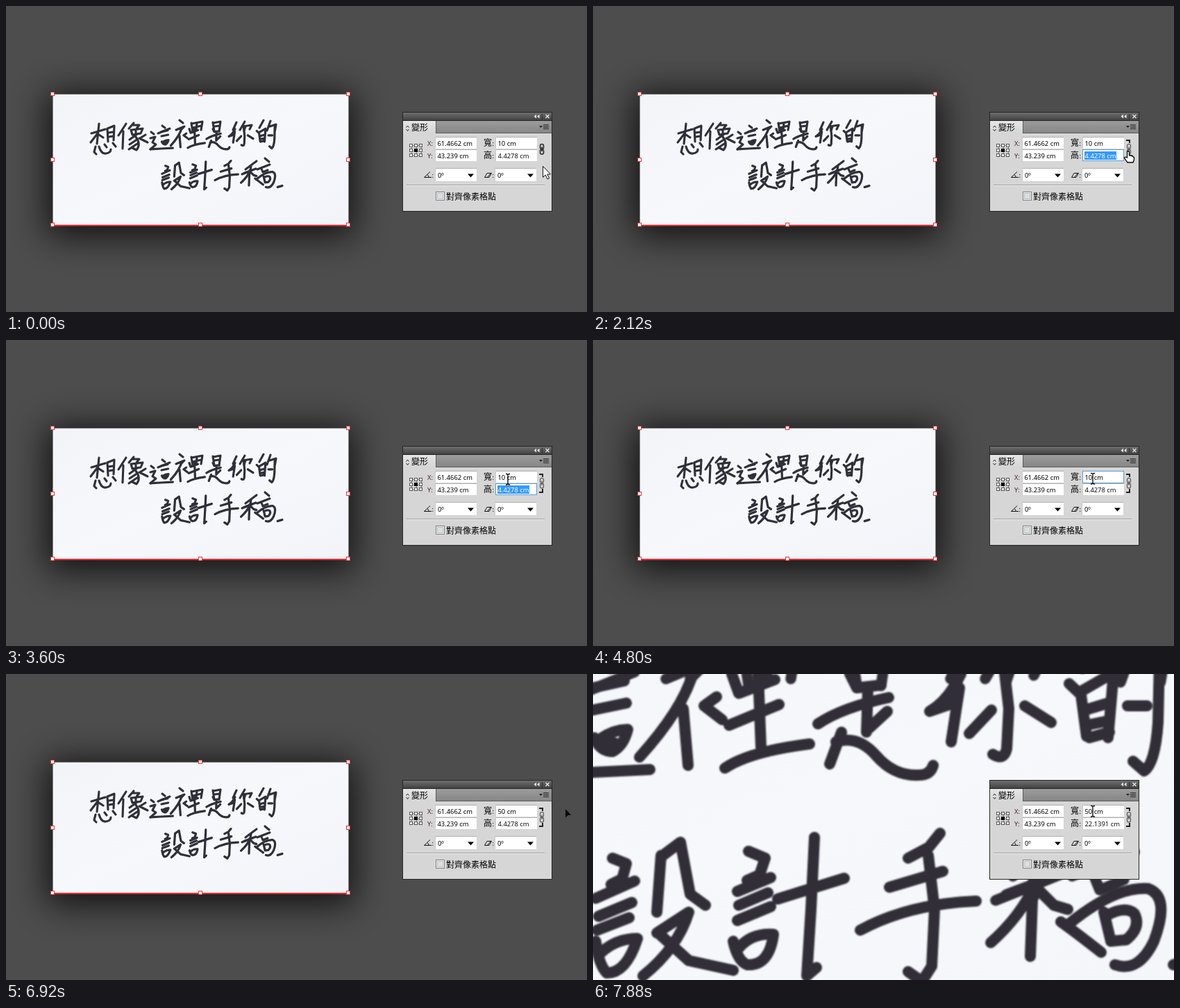
Write an HTML page that moves like this. It is 837x442 px and loops after 8000 ms.

```html
<!DOCTYPE html>
<html lang="zh-Hant">
<head>
<meta charset="utf-8">
<title>變形</title>
<style>
html, body { margin: 0; width: 100%; height: 100%; overflow: hidden; background: #4d4d4d; }
svg { display: block; width: 837px; height: 442px; }
text { font: 9.4px "Noto Sans", "Open Sans", sans-serif; fill: #000; }
.cjk { font: 500 12px "Noto Sans CJK TC", "Noto Sans CJK", sans-serif; }
.ink path { fill: none; stroke: #302f39; stroke-linecap: round; stroke-linejoin: round; }
.box { shape-rendering: crispEdges; }
</style>
</head>
<body>
<svg viewBox="0 0 837 442">
  <defs>
    <linearGradient id="paper" x2="1" y2="1">
      <stop stop-color="#f2f4f8"/><stop offset=".5" stop-color="#f6f8fb"/><stop offset="1" stop-color="#f2f4f9"/>
    </linearGradient>
    <linearGradient id="bar" x2="0" y2="1"><stop stop-color="#6e6e6e"/><stop offset="1" stop-color="#424242"/></linearGradient>
    <linearGradient id="tabs" x2="0" y2="1"><stop stop-color="#9c9c9c"/><stop offset="1" stop-color="#858585"/></linearGradient>
    <linearGradient id="tab" x2="0" y2="1"><stop stop-color="#e6e6e6"/><stop offset="1" stop-color="#d5d5d5"/></linearGradient>
    <filter id="blur" x="-30%" y="-50%" width="160%" height="200%"><feGaussianBlur stdDeviation="25"/></filter>
    <filter id="soft" filterUnits="userSpaceOnUse" x="67" y="127" width="426" height="189"><feGaussianBlur stdDeviation=".2"/></filter>
  </defs>

  <rect width="837" height="442" fill="#4d4d4d"/>
  <rect id="shade" x="59" y="126" width="442" height="206" fill="#000" opacity=".78" filter="url(#blur)"/>

  <g id="doc">
    <rect x="67" y="127" width="426" height="189" fill="url(#paper)"/>
    <g filter="url(#soft)">
    <g class="ink" stroke-width="3.1">
      <!-- 想 -->
      <path d="M123 184 143 178M134 170 131 199M132 184 122 197M134 186 140 190M146 177 147 196M146 177 156 173 155 194M148 183 154 182M148 189 154 188M129 203 127 211 130 214M134 203Q137 214 144 213T151 207M142 200 145 204M154 198 158 203"/>
      <!-- 像 -->
      <path d="M173 170 162 187M169 181 168 206M184 169 177 177M183 172 192 172 188 177M180 179 182 186 194 184 197 177 181 179M187 179 187 185M189 185 178 193M187 189Q195 200 188 208L182 205M187 194 178 200M189 199 177 207M201 186 193 191M192 191 204 197"/>
      <!-- 這 -->
      <path d="M225 173 229 176M219 184 236 177M209 182 213 185M208 191 215 189 211 197 216 200 208 207"/>
      <!-- 裡, 是, 你, 的: upper parts -->
      <path d="M250 165 255 169M245 179 257 174 252 179M267 169 269 182M267 170 283 167 281 179M269 176 281 173M275 169 274 179"/>
      <path d="M298 168 300 181M298 169 309 167 307 181M300 174 307 173"/>
      <path d="M332 168 327 179M344 167 337 179M341 174 354 172 351 178M345 174 343 180"/>
      <path d="M371 165 365 176M381 166 376 180M380 174 389 171 387.5 180"/>
      <!-- 稿: upper part -->
      <path d="M361 224 345 236M340 243 360 235M353 231 351 242M373 220 379 225M362 236 380 229M368 235 370 240 377 237"/>
    </g>
    <g class="ink" stroke-width="16" transform="translate(224 177.6) scale(.2)">
      <!-- 這 -->
      <path d="M0 20 45 10M0 52 48 42M2 92Q10 112 28 112Q44 104 50 80Q30 80 10 94L32 100M-80 146 0 142 82 138"/>
      <!-- 裡 -->
      <path d="M146 -8Q132 48 67 120M130 50 137 132M178 33 160 46 186 66M200 0 210 28 262 8M196 74 268 44M238 0 242 106M190 136Q225 112 312 101"/>
      <!-- 是 -->
      <path d="M370 0 380 20 415 16M324 72Q360 48 426 34M396 20 394 84M398 78 424 54M358 84 341 130M350 98Q382 88 408 118T470 146Q486 146 490 132"/>
      <!-- 你 -->
      <path d="M530 0Q512 38 485 54L520 42M528 20 516 98M574 52 542 86M592 -10 599 50 596 108Q592 126 576 116M622 46 660 70"/>
      <!-- 的 -->
      <path d="M686 14 703 30 711 90M705 24 750 -2 742 92M709 52 742 42M711 74 740 68M715 92 744 84M770 46 798 46M816 -20 814 70Q810 130 794 140L778 126"/>
      <!-- 設 -->
      <path d="M28 266 48 274 42 296 26 304M4 324 60 299M8 350 56 330M6 370 52 352M4 386Q8 420 20 432Q48 432 64 382Q34 382 12 402M98 262 92 344M98 264 126 243 140 318 162 334M92 374 138 344Q122 396 72 436M96 376 138 414 202 428"/>
      <!-- 計 -->
      <path d="M224 256 248 266 240 290 222 298M208 314 256 294M210 334 252 316M208 356 256 336M202 386Q208 414 222 420Q254 422 260 376Q228 374 210 396M266 325 362 295M319 236 314 340 308 436 322 424"/>
      <!-- 手 -->
      <path d="M500 230 484 250 454 266M427 308 504 285M385 370Q455 332 552 328M483 262 492 340 488 422 474 444 454 430"/>
      <!-- 稿 -->
      <path d="M595 319 656 296M638 302Q616 350 573 388M634 300 630 408M644 314 664 334 684 340M674 358Q694 372 732 402M682 364Q752 306 800 310Q832 322 808 386Q786 432 752 420M736 344 746 386M738 350Q766 334 780 346Q790 366 768 384L746 386"/>
      <path d="M836 420 870 410"/>
    </g>
    </g>
  </g>

  <g id="frame" class="box">
    <path d="M67.5 316V127.5H493.5V316" fill="none" stroke="#8d8587"/>
    <path d="M67 317H493" stroke="#f8242c" stroke-width="2"/>
    <g id="grips" fill="#fff" stroke="#e8343a"></g>
  </g>

  <g id="panel">
    <g class="box">
      <rect x="571" y="153" width="216" height="144" fill="#262626"/>
      <rect x="572" y="154" width="214" height="11" fill="url(#bar)"/>
      <rect x="572" y="166" width="214" height="18" fill="url(#tabs)"/>
      <rect x="572" y="183" width="214" height="113" fill="#d6d6d6"/>
      <rect x="572" y="166" width="47" height="18" fill="url(#tab)"/>
      <path d="M619.5 166V183M619 183.5H786" stroke="#5c5c5c"/>
      <path d="M772.5 156V164" stroke="#2e2e2e"/>
      <path d="M577 258.5H776" stroke="#a2a2a2"/>
      <path d="M577 259.5H776" stroke="#ececec"/>
      <path d="M774 171.5H782M774 173.5H782M774 175.5H782M774 177.5H782" stroke="#333"/>
    </g>
    <path d="M764 156.5V162.5L760.5 159.5ZM768.5 156.5V162.5L765 159.5Z" fill="#e4e4e4"/>
    <path d="M777.5 157 782.5 162M782.5 157 777.5 162" stroke="#eee" stroke-width="1.3"/>
    <path d="M768 173H773L770.5 176Z" fill="#222"/>
    <path d="M576.5 175.5 578.5 173 580.5 175.5M576.5 178 578.5 180.5 580.5 178" fill="none" stroke="#222"/>
    <text class="cjk" x="584" y="180">變形</text>
    <g id="fields" class="box"></g>
    <g id="dots" class="box" transform="translate(0 1)"></g>
    <text x="607" y="201.5" style="fill:#4a2a26">X:</text>
    <text x="607" y="219.5" style="fill:#4a2a26">Y:</text>
    <text class="cjk" x="688" y="202">寬</text><text x="700.5" y="201.5">:</text>
    <text class="cjk" x="688" y="220">高</text><text x="700.5" y="219.5">:</text>
    <path d="M613 247.5H602.5L611 239.5M607 244Q609.5 245 609 247.5" fill="none" stroke="#111"/>
    <path d="M689.5 247.5 693 241.5H699.5L696 247.5ZM694 247 698 242" fill="none" stroke="#111"/>
    <text x="613.5" y="248">:</text><text x="700.5" y="248">:</text>
    <text x="621.5" y="201.5">61.4662 cm</text>
    <text x="621.5" y="219.5">43.239 cm</text>
    <text x="622" y="248">0º</text><text x="708" y="248">0º</text>
    <path d="M665 242.5H674L669.5 247.5ZM751 242.5H760L755.5 247.5Z" fill="#000"/>
    <rect x="619.5" y="268.5" width="12" height="12" fill="#f3f3f3" stroke="#808080"/>
    <rect x="621.5" y="270.5" width="8" height="8" fill="#dcdfe1" stroke="#b9bec2"/>
    <text class="cjk" x="634" y="279.5">對齊像素格點</text>

    <rect id="wFocus" class="box" x="705.5" y="189.5" width="59" height="17" fill="none" stroke="#5b9fd0"/>
    <rect id="hFocus" class="box" x="705.5" y="207.5" width="59" height="16" fill="none" stroke="#5b9fd0"/>
    <rect id="wMark" x="708" y="192" width="11" height="12" fill="#3399ff"/>
    <rect id="hMark" x="708" y="210" width="46" height="12" fill="#3399ff"/>
    <text x="708.5" y="201.5"><tspan id="wNum">10</tspan> cm</text>
    <text id="high" x="708.5" y="219.5">4.4278 cm</text>
    <path id="caret" class="box" d="M719.5 191V204" stroke="#000"/>

    <g id="chain" fill="none" stroke="#3a3a3a">
      <rect x="769.5" y="199.5" width="5" height="7" rx="2.5"/>
      <rect x="769.5" y="207" width="5" height="7" rx="2.5"/>
      <path d="M772 203.5V210"/>
    </g>
    <path id="bracket" class="box" d="M768 193.5H772.5V198M768 219.5H772.5V214.5" fill="none" stroke="#222" stroke-width="2"/>
  </g>

  <g id="cursor">
    <path id="arrow" d="M.5.5V16.5L4.2 13 7 19 9.5 17.9 6.8 12H11.5Z" fill="#fff" stroke="#111"/>
    <path id="solid" d="M0 0V12.5L3.2 9.3 8 8.6Z" fill="#0a0a0a"/>
    <path id="beam" d="M-3-7.5H-1.5L0-6.5 1.5-7.5H3M0-6.5V7M-3 8H-1.5L0 7 1.5 8H3" fill="none" stroke="#000" stroke-width="1.3"/>
    <path id="hand" d="M-1.5 9V.5Q0-1.5 1.5.5V6L4 5.5 4.5 6.5 6.5 6.5 7 8 8.5 8.5V12L7 16H-1L-5.5 9.5Q-5 7.5-3 8.5Z" fill="#fff" stroke="#000" stroke-width="1.3"/>
  </g>
</svg>
<script>
const LOOP = 8000, STEP = 40;
const $ = id => document.getElementById(id);
const set = (id, attrs) => { for (const k in attrs) $(id).setAttribute(k, attrs[k]); };
const show = (id, on) => { $(id).style.display = on ? "" : "none"; };
const rect = (x, y, w, h, more = "") => `<rect x="${x}" y="${y}" width="${w}" height="${h}" ${more}/>`;

const field = (x, y, w, h) => rect(x, y, w, h, 'fill="#fff"') +
  `<path d="M${x} ${y + .5}H${x + w}" stroke="#b0b0b0"/><path d="M${x + .5} ${y}V${y + h}" stroke="#c8c8c8"/>`;

$("fields").innerHTML = [618, 705].map(x => field(x, 189, 60, 17) + field(x, 207, 60, 17)).join("") +
  field(618, 234, 60, 19) + field(704, 234, 60, 19);

// eight selection grips and the 3 x 3 reference point picker
let grips = "", dots = '<path d="M584 200.5H598V215.5H584ZM584 208H598M591 200V216" fill="none" stroke="#888"/>';
for (let r = 0; r < 3; r++) for (let c = 0; c < 3; c++) {
  const mid = r === 1 && c === 1;
  if (!mid) grips += rect([64.5, 277.5, 490.5][c], [124.5, 219.5, 313.5][r], 5, 5);
  dots += rect(581.5 + c * 7, 198.5 + r * 7, 4, 4, `fill="${mid ? "#000" : "#f4f4f4"}" stroke="${mid ? "#000" : "#555"}"`);
}
$("grips").innerHTML = grips;
$("dots").innerHTML = dots;

// pointer path: time, x, y
const path = [
  [0, 773, 231], [560, 773, 231], [880, 772, 211], [1440, 772, 211], [1600, 774, 212],
  [2040, 774, 212], [2440, 757, 203], [2560, 768, 218], [2680, 773, 221], [2880, 766, 220],
  [2920, 766, 220], [3320, 735, 204], [3680, 720, 199.5], [4800, 720, 199.5], [4960, 737, 199.5],
  [5120, 737, 199.5], [5240, 742, 199.5], [5400, 720, 199.5], [5560, 720, 199.5], [5720, 710, 199.5],
  [5800, 710, 199.5], [6000, 773, 207], [6200, 810, 197], [6480, 810, 197], [6680, 806, 194.5],
  [7160, 806, 194.5], [7560, 745, 199], [7880, 720, 197.5], [LOOP, 720, 197.5]
];

function pointer(t) {
  const i = path.findIndex(p => p[0] > t);
  const [t0, x0, y0] = path[i - 1], [t1, x1, y1] = path[i];
  const k = (t - t0) / (t1 - t0);
  return [x0 + (x1 - x0) * k, y0 + (y1 - y0) * k];
}

function shape(x, y) {
  if (x > 787) return "solid";
  if (x >= 705 && x < 765 && y < 224) return "beam";
  if (x >= 767 && x < 778 && y < 219) return "hand";
  return "arrow";
}

const fade = (t, from, to) => Math.min(1, Math.max(0, (t - from + STEP) / (to - from)));
const within = (t, a, b) => t >= a && t < b;

function draw(t) {
  const big = t >= 6960, linked = t >= 1320;
  set("doc", { transform: big ? "translate(-1120 -888) scale(5)" : "" });
  show("shade", !big);
  show("frame", !big);

  const hOn = within(t, 1280, 3960), wOn = within(t, 5680, 6520);
  show("hMark", hOn);
  show("wMark", wOn);
  $("high").style.fill = hOn ? "#fff" : "#111";
  $("wNum").style.fill = wOn ? "#fff" : "#000";
  $("wNum").textContent = t < 6520 ? "10" : t < 6640 ? "5" : "50";
  $("high").textContent = (t < 7200 ? "4.4278" : "22.1391") + " cm";
  set("hFocus", { opacity: fade(t, 1280, 1920) * (1 - fade(t, 3960, 4320)) });
  set("wFocus", { opacity: t < 6920 ? fade(t, 3960, 4320) : 0 });
  show("caret", within(t, 3960, 4480));
  show("bracket", linked);
  set("chain", { stroke: linked ? "#555" : "#303030", "stroke-width": linked ? 1.2 : 1.7 });

  const [x, y] = pointer(t), kind = shape(x, y);
  for (const id of ["arrow", "solid", "beam", "hand"]) show(id, id === kind);
  set("cursor", { transform: `translate(${Math.round(x)} ${Math.round(y)})` });
}

const start = performance.now();
function tick() {
  const t = (performance.now() - start) % LOOP;
  draw(Math.floor(t / STEP) * STEP);
  requestAnimationFrame(tick);
}
draw(0);
requestAnimationFrame(tick);
</script>
</body>
</html>
```
